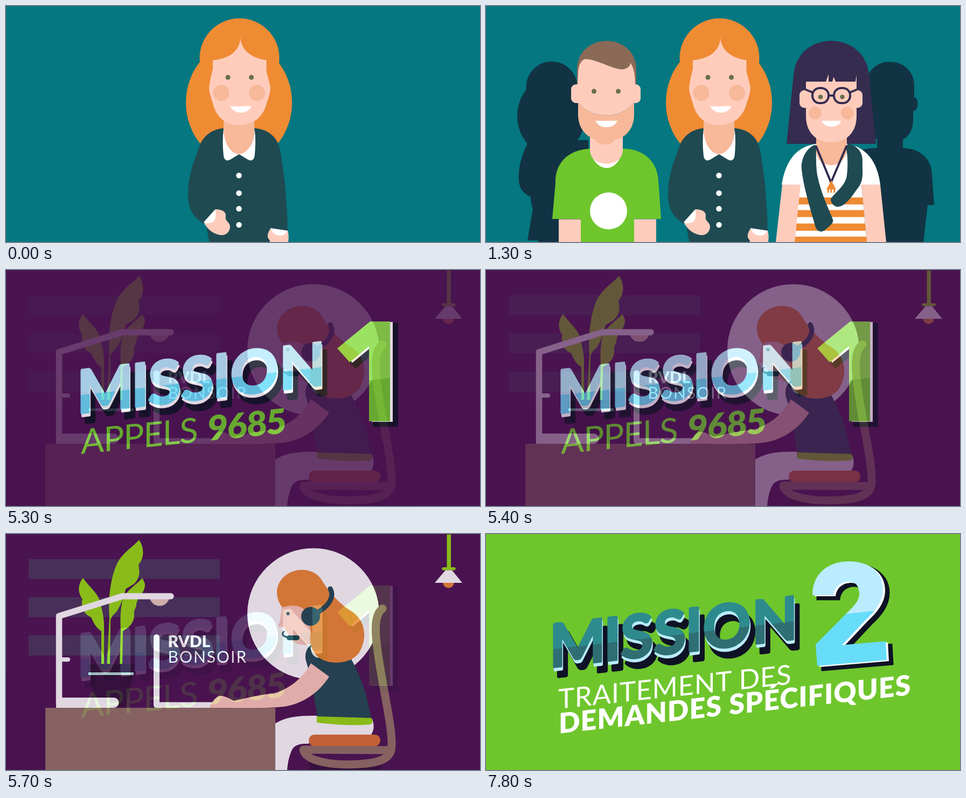
Animation of 880 by 440 pixels, one loop 8000 ms. Source, as an HTML page:

```html
<!DOCTYPE html>
<html lang="fr">
<head>
<meta charset="utf-8">
<title>Missions</title>
<style>
  html, body { margin: 0; height: 100%; overflow: hidden; background: #047780; }
  svg { display: block; width: 100vw; height: 100vh; }
  text { font-family: Lato, "Open Sans", sans-serif; }
  .black { font-weight: 900; }

  .skin { fill: #ffccbc; }
  .blush { fill: #f7b99a; }
  .orange { fill: #ef8b33; }
  .teal { fill: #1f4a52; }
  .navy { fill: #352c50; }
  .eye { fill: #67704f; }
  .white { fill: #fff; }
  .green { fill: #6ec62c; }
  .lime { fill: #96de0f; }
  .wood { fill: #927166; }
  .plum { fill: #34123a; }
  .shade { fill: #123343; }
  .ink { fill: #0e1224; stroke: #0e1224; }
  .line { fill: none; stroke-linecap: round; stroke-linejoin: round; }

  .scene, .friend, .shadow { animation: 8s step-end infinite; }
  #title1 { animation-name: title1; }
  #office { animation-name: office; }
  #title2 { animation-name: title2; }
  .friend { animation-name: friend; }
  .shadow { animation-name: shadow; }
  .left { --dir: 1; }
  .right { --dir: -1; }

  @keyframes title1 { 0% { opacity: 0 } 41.25%, 100% { opacity: 1 } }
  @keyframes title2 { 0% { opacity: 0 } 97.5%, 100% { opacity: 1 } }
  @keyframes office {
    0% { opacity: 0 }
    66.25% { opacity: .1667 }
    67.5% { opacity: .3333 }
    68.75% { opacity: .5 }
    70% { opacity: .6667 }
    71.25% { opacity: .8333 }
    72.5%, 100% { opacity: 1 }
  }
  @keyframes friend {
    0% { opacity: 0; transform: translateX(calc(var(--dir) * 190px)) }
    6.25% { opacity: 1; transform: translateX(calc(var(--dir) * 190px)) }
    8.75% { opacity: 1; transform: translateX(calc(var(--dir) * 120px)) }
    11.25% { opacity: 1; transform: translateX(calc(var(--dir) * 70px)) }
    13.75% { opacity: 1; transform: translateX(calc(var(--dir) * 30px)) }
    16.25%, 100% { opacity: 1; transform: none }
  }
  @keyframes shadow {
    0% { opacity: 0; transform: translateX(calc(var(--dir) * 150px)) }
    11.25% { opacity: 1; transform: translateX(calc(var(--dir) * 150px)) }
    13.75% { opacity: 1; transform: translateX(calc(var(--dir) * 65px)) }
    16.25%, 100% { opacity: 1; transform: none }
  }
</style>
</head>
<body>
<svg viewBox="0 0 880 440" preserveAspectRatio="none">
  <defs>
    <linearGradient id="ice" gradientUnits="userSpaceOnUse" x1="0" y1="0" x2="0" y2="499">
      <stop offset=".5" stop-color="#baecff"/><stop offset=".5" stop-color="#68ddfa"/>
    </linearGradient>
    <linearGradient id="sea" gradientUnits="userSpaceOnUse" x1="0" y1="0" x2="0" y2="499">
      <stop offset=".5" stop-color="#2e8b8d"/><stop offset=".5" stop-color="#2f6f73"/>
    </linearGradient>
    <linearGradient id="leaf" gradientUnits="userSpaceOnUse" x1="0" y1="0" x2="0" y2="560" gradientTransform="skewY(-6.3)">
      <stop offset=".5" stop-color="#88dd44"/><stop offset=".5" stop-color="#6ec62c"/>
    </linearGradient>
    <linearGradient id="ice2" gradientUnits="userSpaceOnUse" x1="0" y1="0" x2="0" y2="448" gradientTransform="skewY(-6.4)">
      <stop offset=".5" stop-color="#baecff"/><stop offset=".5" stop-color="#68ddfa"/>
    </linearGradient>
    <clipPath id="torso"><path d="M584 333H697L707 440H573Z"/></clipPath>
    <text id="word" x="184 249 294 355 400 461 550" y="283" text-anchor="middle" font-size="111" font-weight="700">MISSION</text>
    <path id="one" d="M676 96H713V282H674V142L638 172L615 146Z"/>
    <path id="two" d="M606 114C606 75 634 51 674 51C712 51 737 72 737 103C737 127 721 145 705 160L661 207L742 200L744 235L615 246L612 206L680 137C692 124 695 115 692 104C690 94 684 89 674 89C660 89 647 97 645 114Z"/>
  </defs>

  <g id="team">
    <rect width="880" height="440" fill="#047780"/>
    <g class="shadow left shade">
      <circle cx="122" cy="151" r="47.5"/>
      <ellipse cx="121" cy="205" rx="63" ry="72"/>
      <path d="M80 250C65 280 60 300 61 325C62 345 75 352 83 356C83 366 85 373 87 378L77 437H97V440H190V250Z"/>
    </g>
    <g class="shadow right shade">
      <path d="M705 150C705 122 725 104 750 104C775 104 795 122 795 148V170C804 170 804 196 793 196V212C793 232 784 244 774 249V265C805 265 828 285 828 315L832 371H820L812 440H690V270C705 266 715 265 726 265V249C712 240 705 228 705 210Z"/>
    </g>

    <g class="friend left">
      <path d="M169 150V118C169 85 195 65 224 65C253 65 279 85 279 118V150Z" fill="#8a6a56"/>
      <path class="green" d="M193 266C150 268 128 295 129 330L123 397H176V440H275V397H325L320 325C318 290 293 266 254 266Z"/>
      <path class="skin" d="M135 397.500H176V440H135ZM275 397.500H316V440H275Z"/>
      <path class="white" d="M193 270C199 292 212 302 224 302C236 302 248 292 254 270Z"/>
      <path class="skin" d="M193 235H254V268C254 285 240 294 223.500 294C207 294 193 285 193 268Z"/>
      <ellipse class="blush" cx="221" cy="250" rx="17" ry="8.500"/>
      <rect class="skin" x="158" y="146" width="24" height="35" rx="9"/>
      <rect class="skin" x="263" y="146" width="24" height="35" rx="9"/>
      <path class="blush" d="M171 175H275V202C275 235 252 252 223 252C194 252 171 235 171 202Z"/>
      <path class="skin" d="M170 148L171 125C172 105 180 98 187 99C210 101 238 120 256 118C264 116 268 111 268 106C275 115 277 130 277 148L275 180C250 212 196 212 171 180Z"/>
      <path class="line" d="M171 180C196 212 250 212 275 180" stroke="#b8a598" stroke-width=".7"/>
      <circle class="eye" cx="200.500" cy="159" r="4.500"/>
      <circle class="eye" cx="245.500" cy="159" r="4.500"/>
      <path class="white" d="M203 214H244C240 222 233 226 223.500 226C214 226 207 222 203 214Z"/>
      <circle class="white" cx="227.500" cy="382" r="34.500"/>
    </g>

    <g class="friend right">
      <path class="navy" d="M558 257L571 128C575 88 605 65 641 65C678 65 708 90 711 128L724 257Z"/>
      <path class="skin" d="M550 333H586L573 440H538ZM697 333H732L743 440H707Z"/>
      <path class="white" d="M613 257C575 262 556 290 549 333H584L573 440H707L697 333H732C727 290 705 262 670 257Z"/>
      <g class="orange" clip-path="url(#torso)">
        <path d="M570 357h140v13h-140zM570 380.500h140v13h-140zM570 405.500h140v13.500h-140zM570 430h140v10h-140z"/>
      </g>
      <path class="blush" d="M613 240H670V270C668 285 655 297 641 297C625 297 613 285 613 270Z"/>
      <path class="teal" d="M610 259C595 265 584 285 586 305C590 340 600 370 611 410C614 420 622 424 630 417C638 410 646 405 644 398C635 375 622 350 615 315C612 295 613 280 613 260ZM672 257C685 258 700 270 699 290C698 305 703 325 690 340C682 350 670 372 655 374C648 376 640 368 640 360C650 345 668 335 670 315C672 300 672 280 668 262Z"/>
      <path class="line" d="M613 262L640.500 329L669 262" stroke="#352c50" stroke-width="4"/>
      <path class="orange" d="M641 325L650 342H648V348H645V342H642.500V348H639.500V342H637V348H634V342H632Z"/>
      <rect class="skin" x="582" y="157" width="22" height="33" rx="9"/>
      <rect class="skin" x="677" y="157" width="22" height="33" rx="9"/>
      <path class="skin" d="M594 141H631L636 127V141H643L645.500 132L649 141H686L688 128V205C688 237 668 254 641 254C614 254 594 237 594 205Z"/>
      <circle class="blush" cx="611" cy="199.500" r="12"/>
      <circle class="blush" cx="671" cy="199.500" r="12"/>
      <circle class="eye" cx="621" cy="169.500" r="4.300"/>
      <circle class="eye" cx="661.500" cy="169.500" r="4.300"/>
      <g class="line" stroke="#352c50" stroke-width="4">
        <rect x="606" y="153" width="30" height="28" rx="13.500"/>
        <rect x="646" y="153" width="30" height="28" rx="13.500"/>
        <path d="M636 167H646M606 161L594 156M676 161L688 156"/>
      </g>
      <path class="white" d="M623 214H660C656 221 650 225 641 225C633 225 626 221 623 214Z"/>
    </g>

    <g id="lead">
      <ellipse class="orange" cx="432.500" cy="180" rx="98.500" ry="112"/>
      <circle class="orange" cx="433.500" cy="97" r="74"/>
      <path class="teal" d="M404 228C385 229 366 240 358 264C354 278 338 310 338 352C338 380 350 399 373 408V418C375 425 375 432 378 440H523V420C522 360 516 310 509 268C504 245 488 230 462 228Z"/>
      <path class="blush" d="M404 205H461V232C461 255 448 277 432.500 277C418 277 404 255 404 232Z"/>
      <path id="collar" class="white" d="M404 228C402 245 402 262 404 280C406 288 410 290 417 286L432.500 276.500C416 274 404 255 404 228Z"/>
      <use href="#collar" transform="translate(865.500 0) scale(-1 1)"/>
      <path class="skin" d="M435 58C435 85 412 99 384 101V117C380 134 377 146 377 156C379 166 381 172 384 181C389 205 406 222 433 222C460 222 478 206 484 181C488 170 491 160 491 152C489 140 485 130 483.500 122V101C455 97 436 82 435 58Z"/>
      <circle class="eye" cx="412" cy="133" r="4.500"/>
      <circle class="eye" cx="455.500" cy="133" r="4.500"/>
      <circle class="blush" cx="399.500" cy="162" r="15"/>
      <circle class="blush" cx="466" cy="162" r="15"/>
      <path class="white" d="M416 187H456C452 194 445 199 436 199C427 199 420 194 416 187Z"/>
      <path class="line" d="M432.500 316h0M432.500 349h0M432.500 378h0M432.500 408h0" stroke="#fff" stroke-width="10.500"/>
      <path class="skin" d="M389 379C398 379 409 382 408 392C406 402 416 402 416 412C415 423 407 428 398 427C387 426 374 417 368 405Z"/>
      <path class="white" d="M388.500 379L367 403C372 407 382 405 386 401C390 396 390 388 388.500 379Z"/>
      <path class="skin" d="M491 415C488 420 485 425 486 431C487 435 490 435 490 440H524C525 432 525 425 523 419Z"/>
      <path class="white" d="M491 414L523 419C520 425 514 429 507 428C499 427 494 422 491 414Z"/>
    </g>
  </g>

  <g id="title1" class="scene">
    <rect width="880" height="440" fill="#4a1450"/>
    <g transform="skewY(-6.67)" stroke-linejoin="round">
      <use href="#word" class="ink" x="9" y="18" stroke-width="7"/>
      <use href="#word" x="1.500" y="6" fill="#fff" stroke="#fff" stroke-width="4"/>
      <use href="#word" fill="url(#ice)" stroke="url(#ice)" stroke-width="4"/>
    </g>
    <use href="#one" class="ink" x="11" y="6.500" stroke-width="8"/>
    <use href="#one" x="5" y="1" fill="#fff"/>
    <use href="#one" fill="url(#leaf)"/>
    <g class="green" transform="translate(139 343) skewY(-5.9)" font-size="64">
      <text letter-spacing="-1.400">APPELS</text>
      <text class="black" x="236" letter-spacing="-1">9685</text>
    </g>
  </g>

  <g id="office" class="scene">
    <rect width="880" height="440" fill="#4a1450"/>
    <path d="M42 47h355v37h-355zM42 118h355v37h-355zM42 189h355v37.500h-355z" fill="#48355c"/>
    <circle class="white" cx="570.500" cy="149" r="122.500"/>

    <path class="lime" d="M818.500 1H826V62H832A2.500 2.500 0 0 1 832 67.500H812A2.500 2.500 0 0 1 812 62H818.500Z"/>
    <circle class="orange" cx="821.500" cy="90" r="10.500"/>
    <path class="white" d="M816 67.500H828L847 91H796Z"/>

    <path class="plum" d="M151 243H239L236 260L222 324H166L155 260Z"/>
    <path d="M153 258h84v5h-84z" fill="#badfdc"/>
    <g class="lime">
      <path d="M192 155C189 120 195 80 205 58C215 35 235 25 247 11C257 25 257 45 246 57C247 66 249 70 246 80C241 96 228 97 222 103C219 118 212 135 205 145C200 150 197 152 194 160L193 242H187.500Z"/>
      <path d="M143 82C132 95 134 112 142 121C138 135 145 150 158 155C162 165 168 176 177 181V242H182V178C183 165 180 145 175 130C173 112 160 105 143 82Z"/>
      <path d="M253 82C242 95 222 105 216 125C212 145 212 160 213 180L211 242H216L217 181C228 175 238 165 238 152C236 140 243 138 242 130C246 115 262 105 257 90Z"/>
    </g>
    <path d="M267 121H303C299 130 293 134 285 134C277 134 271 130 267 121Z" fill="#ebcdbd"/>
    <g class="line" stroke="#fff">
      <path d="M98.500 318V153L216 116H306" stroke-width="11.500"/>
      <path d="M99 234H115" stroke-width="8"/>
      <path d="M279.500 192.500V319H385" stroke-width="11"/>
    </g>
    <path class="white" d="M93 305H200A9.500 9.500 0 0 1 200 324H93Z"/>

    <path class="plum" d="M563 422h135v18h-135z"/>
    <path class="line" d="M699 139C688 147 685 165 687 192C692 260 722 370 715 403L552 402C556 425 610 432 655 429C690 427 712 420 715 402" stroke="#927166" stroke-width="15"/>
    <path class="white" d="M500 353C520 341 545 338 578 339L680 345C685 360 682 368 677 376H568L562 391C540 390 533 396 529 407C524 420 523 430 522 440H500Z"/>
    <rect x="562" y="374" width="133" height="21.500" rx="10.500" fill="#db7233"/>
    <path class="wood" d="M73 324h427v116h-427z"/>

    <path class="teal" d="M567 206C557 213 553 226 558 240L566 268L578 341L678 344C672 308 662 270 639 230Z"/>
    <path class="lime" d="M577 340L678 343C682 346 681 353 677 355C640 358 605 355 577 351.500Z"/>
    <path class="white" d="M568 205C563 215 568 229 580 231L586 222C575 222 569 215 568 205Z"/>
    <path class="skin" d="M566 241L600 266C580 297 550 317 515 322C485 325 440 324 378 324C379 317 390 303 396 302C404 300 415 307 423 311C450 305 475 299 497 297C525 290 552 268 566 241Z"/>
    <path class="skin" d="M512 135C530 125 548 128 558 142L572 165V204C555 209 540 207 531 198L515 173H507C504 171 507 168 508 165C510 155 511 147 512 135Z"/>
    <path class="orange" d="M513 137C498 118 500 92 518 78C540 60 572 65 585 84C600 110 625 135 640 143C668 160 672 195 655 222C640 242 605 245 583 232C566 220 562 200 566 180L556 144C548 132 530 131 513 137Z"/>
    <circle class="teal" cx="523.500" cy="148.500" r="3"/>
    <rect class="teal" x="521" y="189" width="24" height="9" rx="4.500"/>
    <circle class="teal" cx="565.500" cy="153.500" r="17.500"/>
    <g class="line" stroke="#1f4a52">
      <path d="M523 192C514 192 511 185 516 182" stroke-width="3"/>
      <path d="M574 148C597 138 611 118 602 102" stroke-width="9"/>
    </g>
    <g class="white" font-size="30">
      <text class="black" x="300.500" y="211">RVDL</text>
      <text x="300.500" y="239.500" letter-spacing="2">BONSOIR</text>
    </g>
  </g>

  <g id="title2" class="scene">
    <rect class="green" width="880" height="440"/>
    <g transform="translate(-14 -18.500) skewY(-6.67)" stroke-linejoin="round">
      <use href="#word" class="ink" x="9" y="18" stroke-width="7"/>
      <use href="#word" x="1.500" y="6" fill="#baecff" stroke="#baecff" stroke-width="4"/>
      <use href="#word" fill="url(#sea)" stroke="url(#sea)" stroke-width="4"/>
    </g>
    <use href="#two" class="ink" x="10" y="7" stroke-width="5"/>
    <use href="#two" x="4" y="2" fill="#fff"/>
    <use href="#two" fill="url(#ice2)"/>
    <text class="white" transform="translate(134 326) skewY(-6.1)" font-size="51" letter-spacing=".7">TRAITEMENT DES</text>
    <text class="white black" transform="translate(135 372) skewY(-6.3)" font-size="52" letter-spacing="1.050">DEMANDES SPÉCIFIQUES</text>
  </g>
</svg>
</body>
</html>
```
